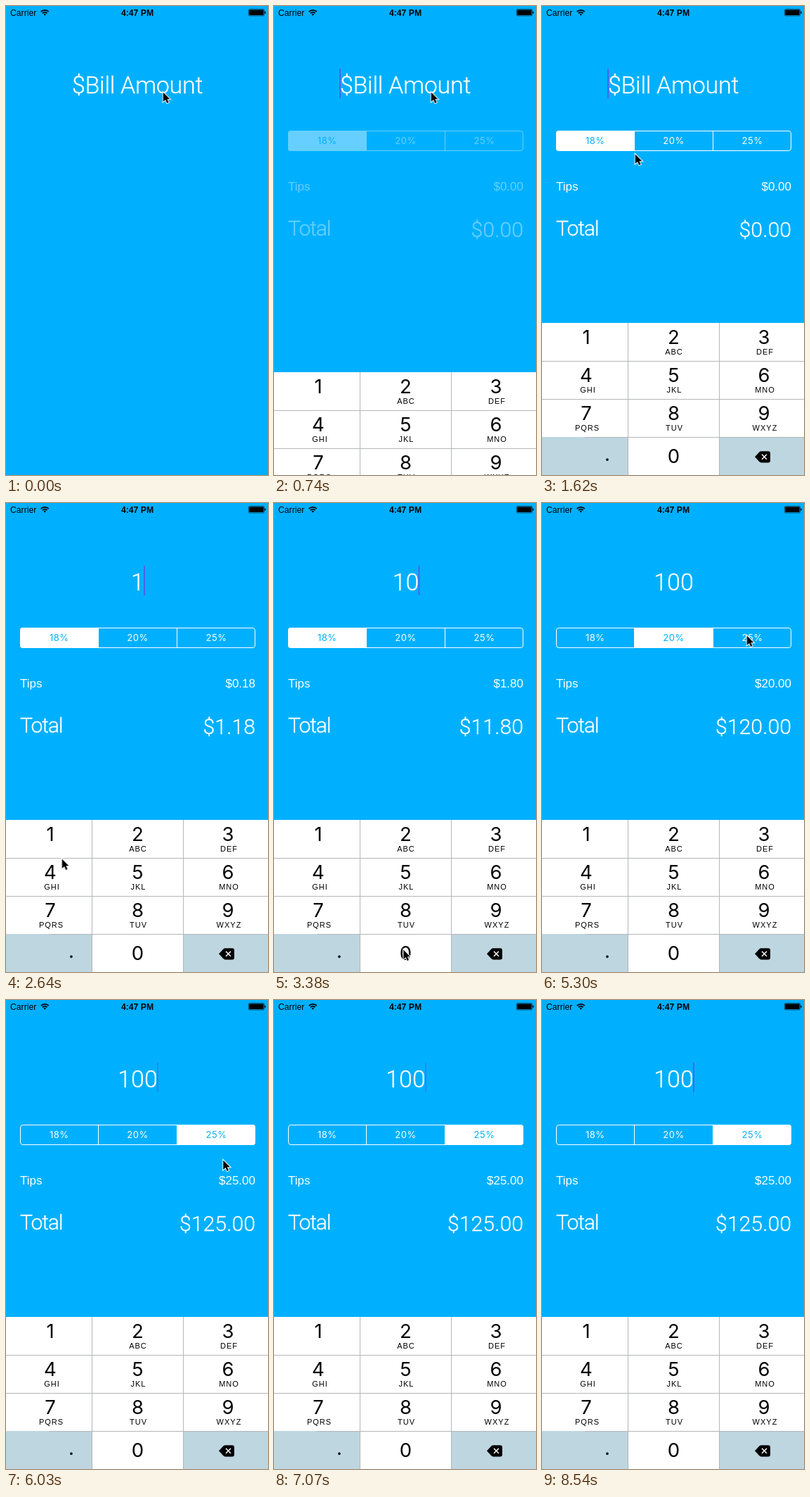
Write an HTML page without scripts that moves like this. It is 373 by 666 pixels and loops after 9080 ms.

```html
<!DOCTYPE html>
<html lang="en">
<head>
<meta charset="utf-8">
<title>Tip calculator</title>
<style>
html, body { margin: 0; width: 100%; height: 100%; overflow: hidden; background: #00b0ff; }
svg { display: block; width: 373px; height: 666px; }
text { font-family: "Liberation Sans", Arial, sans-serif; }
.light text { font-family: Roboto, "Liberation Sans", sans-serif; font-weight: 300; stroke: #fff; stroke-width: .3px; }
.white { fill: #fff; }
.mid { text-anchor: middle; }
.bill { font-size: 34px; text-anchor: middle; }
.hint { letter-spacing: -.3px; }
.tip { font-size: 17px; }
.sum { font-size: 30.3px; }
.label { letter-spacing: -1.2px; }
.end { text-anchor: end; }
.seg text { font-family: Inter, sans-serif; font-size: 13px; letter-spacing: .5px; text-anchor: middle; }
.num text { font-family: Inter, sans-serif; font-size: 27.5px; }
.abc { font-size: 11px; letter-spacing: 1px; }

/* One loop is 9080 ms, drawn about every 147 ms */
.run { animation: 9080ms step-end infinite; }
.reel { animation-name: reel; }
.fade { animation-name: fade; }
.keys { animation-name: keys; }
.pick { animation-name: pick; }
.a { animation-name: pickA; }
.b { animation-name: pickB; }
.c { animation-name: pickC; }
.place { animation-name: place; }
.blink { animation-name: blink; }
.one { animation-name: one; }
.zero { animation-name: zero; }
.arrow { animation-name: arrow; }
.show { animation-name: show; }

@keyframes reel {
  0% { transform: translateY(0); }
  24.22% { transform: translateY(-800px); }
  35.68% { transform: translateY(-1600px); }
  38.87% { transform: translateY(-2400px); }
  55.06% { transform: translateY(-3200px); }
  60.02%, 100% { transform: translateY(-4000px); }
}
@keyframes fade {
  0% { opacity: 0; }
  6.49% { opacity: .1; animation-timing-function: steps(3); }
  11.34%, 100% { opacity: 1; }
}
@keyframes keys {
  0% { transform: translateY(216px); }
  6.49% { transform: translateY(180px); }
  8.14% { transform: translateY(70px); }
  9.8% { transform: translateY(12px); }
  11.34%, 100% { transform: translateY(0); }
}
@keyframes pick {
  0% { transform: translateX(0); }
  55.06% { transform: translateX(111.5px); }
  60.02%, 100% { transform: translateX(223px); }
}
@keyframes pickA { 0% { fill: #00b0ff; } 55.06%, 100% { fill: #fff; } }
@keyframes pickB { 0% { fill: #fff; } 55.06% { fill: #00b0ff; } 60.02%, 100% { fill: #fff; } }
@keyframes pickC { 0% { fill: #fff; } 60.02%, 100% { fill: #00b0ff; } }
@keyframes place {
  0% { transform: translateX(93px); }
  24.22% { transform: translateX(196px); }
  35.68% { transform: translateX(205.5px); }
  38.87%, 100% { transform: translateX(215px); }
}
@keyframes blink {
  0%, 12.99%, 32.37%, 47.02%, 56.71%, 68.06%, 79.51%, 90.85% { opacity: 0; }
  11.34%, 16.29%, 22.68%, 30.72%, 45.37%, 50.22%, 55.06%, 60.02%,
  66.4%, 71.36%, 77.86%, 82.7%, 89.2% { opacity: .5; }
  6.49%, 17.84%, 24.22%, 35.68%, 51.76%, 61.56%, 73.01%, 84.36%, 94.05%, 100% { opacity: 1; }
}
@keyframes one { 0%, 25.88%, 100% { opacity: 0; } 24.22% { opacity: 1; } }
@keyframes zero { 0%, 37.22%, 40.52%, 100% { opacity: 0; } 35.68%, 38.87% { opacity: 1; } }
@keyframes arrow {
  0% { transform: translate(223.5px, 122px); }
  12.99% { transform: translate(223.5px, 122px); animation-timing-function: steps(3); }
  17.84% { transform: translate(132.5px, 210px); }
  19.49% { transform: translate(118px, 268px); animation-timing-function: steps(2); }
  22.68% { transform: translate(64px, 470px); }
  27.42% { transform: translate(66px, 474px); }
  29.07% { transform: translate(79.5px, 505px); }
  30.72% { transform: translate(140px, 624px); }
  32.37% { transform: translate(176px, 638px); }
  34.03% { transform: translate(184px, 634px); }
  40.52% { transform: translate(212px, 570px); }
  42.07% { transform: translate(280px, 380px); }
  43.72% { transform: translate(309px, 274px); }
  45.37% { transform: translate(292.5px, 273px); animation-timing-function: steps(4); }
  51.76% { transform: translate(202px, 190px); }
  56.71% { transform: translate(240px, 189px); }
  58.37% { transform: translate(291.5px, 188px); }
  61.56% { transform: translate(291.5px, 188px); animation-timing-function: steps(3); }
  66.4% { transform: translate(309px, 227px); }
  82.7% { transform: translate(205px, 279px); animation-timing-function: steps(4); }
  89.2%, 100% { transform: translate(223px, 49px); }
}
@keyframes show {
  0%, 82.7% { opacity: 1; }
  73.01%, 90.85%, 100% { opacity: 0; }
}
</style>
</head>
<body>
<svg viewBox="0 0 373 666" xmlns="http://www.w3.org/2000/svg">
  <defs>
    <clipPath id="pill"><rect x="20" y="177" width="335" height="29" rx="4"/></clipPath>
  </defs>
  <rect width="373" height="666" fill="#00b0ff"/>

  <!-- Status bar -->
  <g font-size="12.2">
    <text x="6" y="14">Carrier</text>
    <text class="mid" x="187" y="14" font-weight="700">4:47 PM</text>
  </g>
  <g fill="none" stroke="#000" stroke-width="1.8">
    <path d="M49.7 8.1a7.8 7.8 0 0 1 11.1 0M51.9 10.3a4.7 4.7 0 0 1 6.7 0"/>
    <path d="M55.25 13.7l-1.8-1.9a2.6 2.6 0 0 1 3.6 0z" fill="#000" stroke="none"/>
  </g>
  <rect x="345.3" y="4.6" width="22.2" height="9.4" rx="1.6" fill="none" stroke="#000" stroke-width=".6"/>
  <rect x="346.2" y="5.5" width="20.4" height="7.6" rx=".8"/>
  <path d="M368.3 7.5q1.5 .3 1.5 1.8t-1.5 1.8z"/>

  <!-- Bill -->
  <g class="run reel light white">
    <text class="bill hint" x="187" y="123.5">$Bill Amount</text>
    <text class="bill" x="187.5" y="923.5">1</text>
    <text class="bill" x="187.5" y="1723.5">10</text>
    <text class="bill" x="187.5" y="2523.5">100</text>
    <text class="bill" x="187.5" y="3323.5">100</text>
    <text class="bill" x="187.5" y="4123.5">100</text>
  </g>
  <g class="run place">
    <rect class="run blink" y="89" width="2" height="42" fill="#4a63f0"/>
  </g>

  <g class="run fade">
    <!-- Rate picker -->
    <g class="seg">
      <g clip-path="url(#pill)">
        <rect class="run pick white" x="20" y="177" width="112" height="29"/>
      </g>
      <rect x="20.5" y="177.5" width="334" height="28" rx="3.5" fill="none" stroke="#fff"/>
      <path d="M131.5 177v29M243.5 177v29" stroke="#fff"/>
      <text class="run a" x="75.7" y="196">18%</text>
      <text class="run b" x="187.5" y="196">20%</text>
      <text class="run c" x="299.5" y="196">25%</text>
    </g>

    <!-- Amounts -->
    <g class="white">
      <text class="tip" x="20" y="262">Tips</text>
      <g class="light"><text class="sum label" x="20" y="325.5">Total</text></g>
      <g class="run reel end">
        <g class="tip">
          <text x="355" y="262">$0.00</text>
          <text x="355" y="1062">$0.18</text>
          <text x="355" y="1862">$1.80</text>
          <text x="355" y="2662">$18.00</text>
          <text x="355" y="3462">$20.00</text>
          <text x="355" y="4262">$25.00</text>
        </g>
        <g class="sum light">
          <text x="355" y="328">$0.00</text>
          <text x="355" y="1128">$1.18</text>
          <text x="355" y="1928">$11.80</text>
          <text x="355" y="2728">$118.00</text>
          <text x="355" y="3528">$120.00</text>
          <text x="355" y="4328">$125.00</text>
        </g>
      </g>
    </g>
  </g>

  <!-- Number pad -->
  <g class="run keys">
    <rect y="450" width="373" height="216" fill="#fff"/>
    <path d="M0 612h122.5v54H0zM252.5 612H373v54H252.5z" fill="#bdd6e0"/>
    <rect class="run one" y="450" width="122.5" height="54" fill="#bdd6e0"/>
    <rect class="run zero" x="122.5" y="612" width="130" height="54" fill="#bdd6e0"/>
    <path d="M0 504.5H373M0 558.5H373M61 612.5H373M122.5 450v216M252.5 450v216" stroke="#b4b6b8"/>
    <g class="num mid">
      <text x="63" y="480">1</text>
      <text x="187.5" y="480">2</text>
      <text x="316" y="480">3</text>
      <text x="63" y="534">4</text>
      <text x="187.5" y="534">5</text>
      <text x="316" y="534">6</text>
      <text x="63" y="588">7</text>
      <text x="187.5" y="588">8</text>
      <text x="316" y="588">9</text>
      <text x="187.5" y="649">0</text>
      <text x="93" y="646">.</text>
    </g>
    <g class="abc mid">
      <text x="188" y="495">ABC</text>
      <text x="317.5" y="495">DEF</text>
      <text x="65.5" y="549">GHI</text>
      <text x="188.5" y="549">JKL</text>
      <text x="317.5" y="549">MNO</text>
      <text x="64.5" y="603">PQRS</text>
      <text x="188.5" y="603">TUV</text>
      <text x="317.5" y="603">WXYZ</text>
    </g>
    <path d="M303 640.3l6.3-6.8q1.2-1.3 3-1.3H322q3 0 3 3v10.2q0 3-3 3h-9.7q-1.8 0-3-1.3z"/>
    <path d="M313 636.8l7 7m0-7l-7 7" stroke="#fff" stroke-width="1.5"/>
  </g>

  <!-- Pointer -->
  <g class="run show">
    <path class="run arrow" d="M.3 .5V14L3.6 11.1 5.7 16 8 15 5.9 10.2H9.9Z" stroke="#fff" stroke-width="2" paint-order="stroke"/>
  </g>
</svg>
</body>
</html>
```
